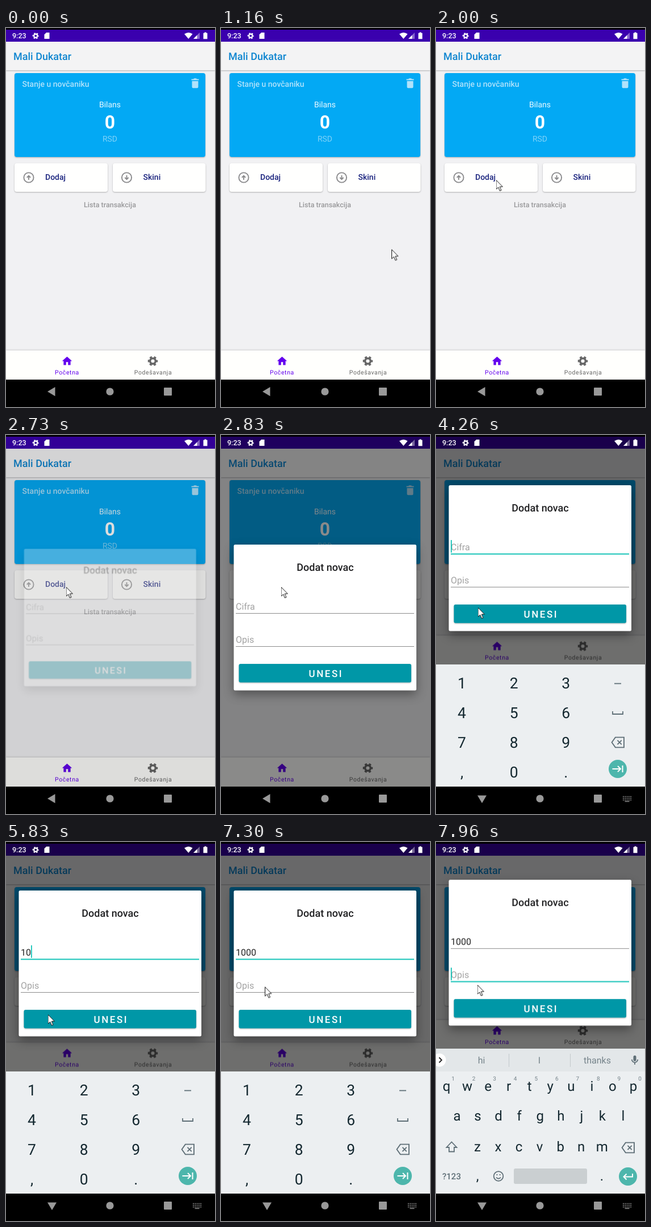
An HTML page for the animation above (8 s loop, 368 by 664 pixels).

```html
<!DOCTYPE html>
<html lang="sr-Latn">
<head>
<meta charset="utf-8">
<title>Wallet app</title>
<style>
  html, body { margin: 0; width: 100%; height: 100%; overflow: hidden; background: #000; }
  svg { display: block; }
  #stage { width: 368px; height: 664px; font-family: Roboto, sans-serif; text-rendering: geometricPrecision; }
  .c, .key { text-anchor: middle; }
  .m { font-weight: 500; }
  .s14 { font-size: 14px; }
  .s16 { font-size: 16px; }
  .s18 { font-size: 18px; }
  .tab { font-size: 10.5px; letter-spacing: .6px; text-anchor: middle; }
  .key { font-size: 26.5px; fill: #13272f; }
  #abc .key { font-size: 24px; }
  .sup { font-size: 10px; fill: #75838a; text-anchor: middle; }
  .line { fill: none; stroke: #5f6f77; stroke-width: 1.8; }
  .go { fill: none; stroke: #fff; stroke-width: 2; }
  .card { filter: drop-shadow(0 1px 1.2px rgba(0, 0, 0, .28)); }
  .bar { filter: drop-shadow(0 -1px 1.5px rgba(0, 0, 0, .14)); }
  #sheet { filter: drop-shadow(0 7px 9px rgba(0, 0, 0, .38)); }
  #pop { transform-origin: 183px 320px; }
</style>
</head>
<body>
<svg id="stage" viewBox="0 0 368 664">
  <defs>
    <symbol id="gear" viewBox="0 0 24 24">
      <g fill="none" stroke="currentColor">
        <circle cx="12" cy="12" r="5.5" stroke-width="4"/>
        <circle cx="12" cy="12" r="8.4" stroke-width="3.2" stroke-dasharray="4.6 4.2" stroke-dashoffset="2.3"/>
      </g>
    </symbol>
    <symbol id="home" viewBox="0 0 24 24">
      <path fill="currentColor" d="M10 20v-6h4v6h5v-8h3L12 3 2 12h3v8z"/>
    </symbol>
    <symbol id="erase" viewBox="0 0 24 24">
      <path class="line" d="M8 3.5H22.5V20.5H8L2 12ZM11.5 8.5l7 7m0-7l-7 7"/>
    </symbol>
    <clipPath id="appClip"><rect y="3" width="368" height="613"/></clipPath>
    <clipPath id="padClip"><rect width="368" height="659"/></clipPath>
  </defs>

  <rect width="368" height="664"/>

  <g clip-path="url(#appClip)">
    <rect y="24" width="368" height="592" fill="#f1f1f3"/>
    <rect class="card" y="20" width="368" height="54" fill="#f3f3f4"/>
    <rect y="3" width="368" height="21" fill="#3a00ae"/>
    <text class="m s18" x="13" y="56" fill="#0f86d0">Mali Dukatar</text>

    <rect class="card" x="15" y="79" width="336" height="147" rx="4" fill="#03a9f4"/>
    <text class="m s14" x="28.5" y="102.500" fill="#b0e2fb">Stanje u novčaniku</text>
    <path fill="#b0e2fb" d="M326.500 89.500h3.500l1-1.200h4l1 1.200h3.500v2h-13zM327.500 93h11v10.300a2 2 0 0 1-2 2h-7a2 2 0 0 1-2-2z"/>
    <text class="c s14" x="183" y="139" fill="#eefaff">Bilans</text>
    <text class="c" x="183" y="176" font-size="32" font-weight="700" fill="#fff">0</text>
    <text class="c s14" x="183" y="199" fill="#7fd2f8">RSD</text>

    <rect class="card" x="15" y="237" width="164" height="50" rx="4" fill="#fffffe"/>
    <rect class="card" x="188" y="237" width="163.500" height="50" rx="4" fill="#fffffe"/>
    <g fill="none" stroke="#8a8a8c" stroke-width="1.900">
      <circle cx="40" cy="262" r="8.600"/>
      <path d="M40 266v-7M36.800 262l3.200-3.200 3.200 3.200"/>
      <circle cx="212.500" cy="262" r="8.600"/>
      <path d="M212.500 258v7M209.300 262l3.200 3.200 3.200-3.200"/>
    </g>
    <text class="m s14" x="69" y="266" fill="#1a237e">Dodaj</text>
    <text class="m s14" x="241.500" y="266" fill="#1a237e">Skini</text>
    <text class="c m" x="183" y="313.500" font-size="12.500" fill="#98989a">Lista transakcija</text>

    <g id="tabs">
      <rect class="bar" y="565" width="368" height="320" fill="#fffffd"/>
      <g id="tabItems">
        <use href="#home" x="97" y="573" width="21" height="21" color="#6200ee"/>
        <text class="tab" x="107.500" y="606.500" fill="#6200ee">Početna</text>
        <use href="#gear" x="248" y="573" width="21" height="21" color="#666"/>
        <text class="tab" x="259" y="606.500" fill="#666">Podešavanja</text>
      </g>
    </g>
    <rect id="dim" y="3" width="368" height="613" opacity="0"/>
  </g>

  <g id="dialog"><g id="pop">
    <rect id="sheet" x="22.500" y="192" width="321.500" height="255.500" rx="2.500" fill="#fff"/>
    <text class="c m s18" x="183.500" y="238" fill="#202022">Dodat novac</text>
    <text id="hint" class="s16" x="26" y="305.500" fill="#a2a2a2">Cifra</text>
    <g id="digits" class="s16" fill="#222"></g>
    <text class="s16" x="26" y="363.500" fill="#a2a2a2">Opis</text>
    <rect x="26" y="312" width="314" height="1" fill="#8c8c8c"/>
    <rect x="26" y="370" width="314" height="1" fill="#8c8c8c"/>
    <g fill="#16c3b8">
      <rect id="focus1" x="26" y="311.500" width="314" height="2"/>
      <rect id="focus2" x="26" y="369.500" width="314" height="2"/>
      <rect id="caret1" x="26" y="288" width="1.800" height="22"/>
      <rect id="caret2" x="26" y="346" width="1.800" height="22"/>
    </g>
    <rect class="card" x="31.500" y="401" width="303.500" height="32.500" rx="3" fill="#0097a7"/>
    <text class="c m" x="184.800" y="424" font-size="17" letter-spacing="2.500" fill="#fff">UNESI</text>
  </g></g>

  <g clip-path="url(#padClip)"><g id="pad">
    <g id="num">
      <rect y="402" width="368" height="214" fill="#eceff1"/>
      <path class="line" d="M314 435.500h12" stroke-width="2"/>
      <path class="line" d="M311 484v5h18v-5"/>
      <use href="#erase" x="307.500" y="526" width="25" height="25"/>
      <circle cx="320" cy="585" r="16" fill="#4db6ac"/>
      <path class="go" d="M310.500 585h14M320 580l5 5-5 5M328.500 579v12"/>
    </g>
    <g id="abc">
      <rect y="362" width="368" height="254" fill="#eceff1"/>
      <rect y="362" width="368" height="40" fill="#e3e7e9"/>
      <circle cx="6" cy="382" r="11.500" fill="#fff"/>
      <path d="M5.500 377.500l4.500 4.500-4.500 4.500" fill="none" stroke="#222" stroke-width="1.800"/>
      <path d="M128.500 371v23M236.500 371v23" stroke="#c3c9cc"/>
      <g class="c s16" fill="#75838a">
        <text x="80" y="388">hi</text><text x="182" y="388">I</text><text x="284" y="388">thanks</text>
      </g>
      <rect x="347.500" y="374" width="5" height="10" rx="2.500" fill="#5f6f77"/>
      <path class="line" d="M344.800 381a5.200 5.200 0 0 0 10.400 0M350 386v4" stroke-width="1.500"/>
      <path class="line" d="M27.500 525.500l9 9.500h-4.500v7.500h-9v-7.500h-4.500z"/>
      <use href="#erase" x="325.500" y="523" width="25" height="25"/>
      <text class="c m" x="27.500" y="591" font-size="15" fill="#5f6f77">?123</text>
      <circle class="line" cx="110" cy="585.500" r="8.300"/>
      <path class="line" d="M106 587.500q4 4.500 8 0M106.500 583h1.800M111.700 583h1.800"/>
      <rect x="137" y="572" width="129" height="27" rx="3" fill="#cacfd1"/>
      <circle cx="338" cy="586" r="16" fill="#4db6ac"/>
      <path class="go" d="M346 581v5.500h-15M335.500 581.500l-5 5 5 5"/>
    </g>
  </g></g>

  <rect y="616" width="368" height="43" fill-opacity=".55"/>
  <g fill="#999">
    <path id="back" d="M73 637l13.500-8v16z"/>
    <path id="down" d="M73 631.500h16l-8 13.500z"/>
    <circle cx="183" cy="637" r="6.600"/>
    <rect x="278" y="630" width="14" height="14" rx="1"/>
    <g id="ime" fill="none" stroke="#999" stroke-width="1.600">
      <path d="M329 633.500h15M329 636.500h15M329 639.500h15" stroke-dasharray="1.800 1.500"/>
      <path d="M332.500 642h8" stroke-width="1.400"/>
    </g>
  </g>

  <g fill="#fff" color="#fff">
    <text class="m" x="11" y="18" font-size="12.500">9:23</text>
    <use href="#gear" x="45.500" y="7" width="13.500" height="13.500"/>
    <path d="M71 8h5.500v11h-9v-7.500z"/>
    <path d="M314 10.500q7.500-5 14.500 0l-7.200 8.500z"/>
    <path d="M341 8v11h-11z" fill-opacity=".4"/>
    <path d="M336.500 12.500v6.500h-6.500z"/>
    <path d="M349.500 7.500h3v1.300h2v10.400h-7v-10.400h2z"/>
  </g>

  <path id="mouse" d="M.5.5v16l3.700-3.400 2.700 6.300 2.600-1.100-2.700-6.200h5z" fill="#fff" stroke="#111" stroke-linejoin="round"/>
</svg>

<script>
  const LOOP = 8000;
  const OUT = 'cubic-bezier(.33,.67,.67,1)';
  const SOFT = 'cubic-bezier(.35,.15,.55,1)';
  const $ = id => document.getElementById(id);

  function addText(parent, cls, x, y, str) {
    const el = document.createElementNS('http://www.w3.org/2000/svg', 'text');
    el.setAttribute('class', cls);
    el.setAttribute('x', x);
    el.setAttribute('y', y);
    el.textContent = str;
    parent.append(el);
    return el;
  }

  function addRow(parent, cls, x, y, step, chars) {
    [...chars].forEach((ch, i) => addText(parent, cls, x + i * step, y, ch));
  }

  // Rows: [ms, properties, easing towards the next row]
  function play(el, rows) {
    const keys = rows.map(([ms, props, easing = 'linear']) => ({ offset: ms / LOOP, easing, ...props }));
    if (rows[0][0] > 0) keys.unshift({ ...keys[0], offset: 0, easing: 'linear' });
    keys.push({ ...keys[keys.length - 1], offset: 1 });
    el.animate(keys, { duration: LOOP, iterations: Infinity });
  }

  function move(el, rows) {
    play(el, rows.map(([ms, x, y, ease]) => [ms, { transform: `translate(${x}px,${y}px)` }, ease]));
  }

  function fade(el, rows) {
    play(el, rows.map(([ms, opacity, ease]) => [ms, { opacity }, ease]));
  }

  // Hard on/off switching at the given times
  function toggle(el, first, ...times) {
    fade(el, [0, ...times].map((ms, i) => [ms, i % 2 ? 1 - first : first, 'step-end']));
  }
  const show = (el, ...times) => toggle(el, 0, ...times);
  const hide = (el, ...times) => toggle(el, 1, ...times);

  ['123', '456', '789', ',0.'].forEach((row, i) => addRow($('num'), 'key', 45.5, 444 + 52 * i, 91.6, row));
  addRow($('abc'), 'key', 18.5, 436, 36.55, 'qwertyuiop');
  addRow($('abc'), 'sup', 30, 418, 36.55, '1234567890');
  addRow($('abc'), 'key', 37, 488, 36.55, 'asdfghjkl');
  addRow($('abc'), 'key', 73, 542, 36.55, 'zxcvbnm');
  addRow($('abc'), 'key', 73, 593, 219, ',.');

  const typed = [5600, 5830, 6100, 6430];
  typed.forEach((ms, i) => show(addText($('digits'), 's16', 26 + 9 * i, 305.5, '1000'[i]), ms));
  hide($('hint'), typed[0]);
  move($('caret1'), [[0, 0, 0, 'step-end'], ...typed.map((ms, i) => [ms, 9 * (i + 1), 0, 'step-end'])]);
  show($('caret1'), 4000, 4500, 5000, 5500, 5600, 6930, 7430, 7560);
  show($('caret2'), 7560);
  show($('focus1'), 4000, 7560);
  show($('focus2'), 7560);

  fade($('dim'), [[2690, 0], [2865, .57]]);
  fade($('pop'), [[2700, 0], [2815, 1]]);
  play($('pop'), [[2700, { transform: 'scale(.9)' }, OUT], [2830, { transform: 'scale(1)' }]]);
  move($('dialog'), [
    [4047, 0, 0, OUT], [4304, 0, -107],
    [7785, 0, -107, OUT], [8000, 0, -126.5]
  ]);

  move($('tabs'), [[0, 0, 0, 'step-end'], [4060, 0, -213.5, 'step-end'], [7785, 0, -253, 'step-end']]);
  hide($('tabItems'), 4060, 4140);

  move($('pad'), [[4030, 0, 130, OUT], [4260, 0, 0]]);
  fade($('pad'), [[4030, 0], [4140, 1]]);
  hide($('num'), 7730);
  show($('abc'), 7730);
  hide($('back'), 4030);
  show($('down'), 4030);
  show($('ime'), 4030);

  show($('mouse'), 1030);
  move($('mouse'), [
    [1030, 326, 405, SOFT], [1830, 120, 267],
    [1850, 120, 266, OUT], [2000, 105.5, 266],
    [3090, 105.5, 266, SOFT], [3430, 81, 309],
    [3590, 81, 309, OUT], [3730, 73.5, 302],
    [6750, 73.5, 302, SOFT], [7000, 83, 258],
    [7250, 83, 258, OUT], [7400, 72.5, 250]
  ]);
</script>
</body>
</html>
```
